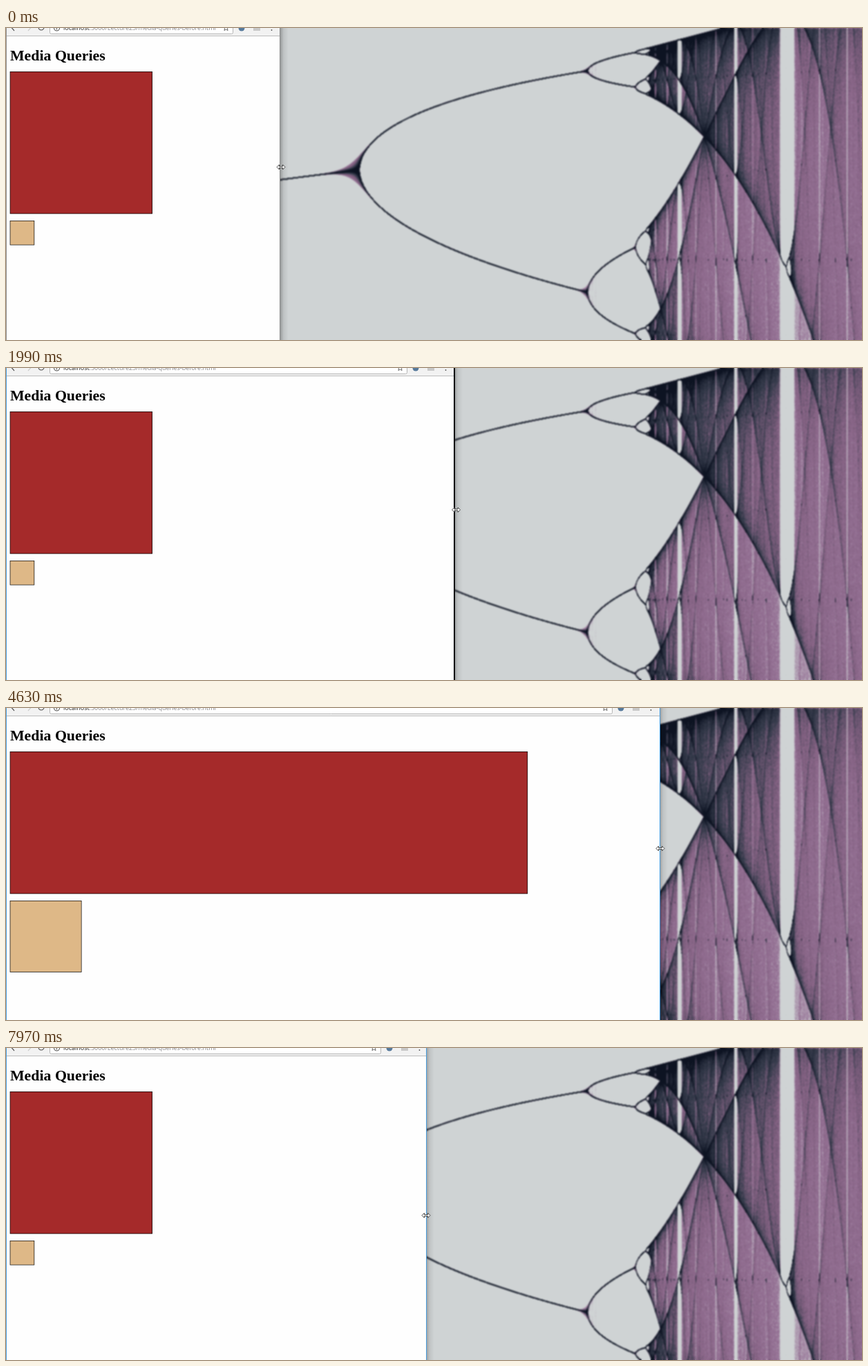
An HTML page with a canvas that plays this animation: 1239 by 452 pixels, repeating every 8000 ms.

```html
<!DOCTYPE html>
<html lang="en">
<head>
<meta charset="utf-8">
<title>Media Queries</title>
<style>
  html, body { margin: 0; height: 100%; overflow: hidden; background: #cfd3d4; }
  canvas { display: block; }
</style>
</head>
<body>
<canvas id="stage" width="1239" height="452"></canvas>
<script>
const WIDTH = 1239, HEIGHT = 452, LOOP = 8000;
const PX = 0.683; // screen pixels per CSS pixel of the shown page
const ctx = document.getElementById('stage').getContext('2d');

const mix = (a, b, p) => a + (b - a) * p;
const clamp01 = p => Math.min(1, Math.max(0, p));

// Piecewise linear value of rows [key, a, b, ...].
function track(rows, key, column = 1) {
  const next = rows.findIndex(row => row[0] > key);
  if (next === 0) return rows[0][column];
  if (next < 0) return rows[rows.length - 1][column];
  const a = rows[next - 1], b = rows[next];
  return mix(a[column], b[column], (key - a[0]) / (b[0] - a[0]));
}

// Density of the attractor to colour: grey, purple, slate, navy.
const RAMP = [
  [0, 207, 211, 212], [0.5, 150, 114, 150], [0.95, 132, 97, 130], [1.9, 54, 60, 76], [4, 13, 19, 34]
];

// Wallpaper: bifurcation diagram of the logistic map x -> r x (1 - x).
function makeWallpaper() {
  const LEFT = 390, SUBS = 8, SKIP = 60, STEPS = 3000, SCALE = 783;
  const sharp = new OffscreenCanvas(WIDTH, HEIGHT);
  const g = sharp.getContext('2d');
  const image = g.createImageData(WIDTH, HEIGHT);
  const unit = SCALE / (SUBS * STEPS);
  let seed = 7;
  const random = () => (seed = seed * 16807 % 2147483647) / 2147483647;

  for (let px = LEFT; px < WIDTH; px++) {
    const density = new Float32Array(HEIGHT + 1);
    for (let sub = 0; sub < SUBS; sub++) {
      const r = 3 + (px + (sub + 0.5) / SUBS - 512) / 734.2;
      let x = 0.42 + 0.1 * random();
      for (let i = 0; i < SKIP + STEPS; i++) {
        x = r * x * (1 - x);
        if (i < SKIP) continue;
        const y = 727 - SCALE * x;
        if (y < 0 || y >= HEIGHT) continue;
        const row = y | 0;
        density[row] += unit * (1 - y + row);
        density[row + 1] += unit * (y - row);
      }
    }
    for (let y = 0; y < HEIGHT; y++) {
      const at = (y * WIDTH + px) * 4;
      for (let c = 0; c < 3; c++) image.data[at + c] = track(RAMP, density[y], c + 1);
      image.data[at + 3] = 255;
    }
  }
  g.putImageData(image, 0, 0);

  const soft = new OffscreenCanvas(WIDTH, HEIGHT);
  const s = soft.getContext('2d');
  s.drawImage(sharp, 0, 0);
  s.filter = 'blur(0.9px)';
  s.drawImage(sharp, 0, 0);
  return soft;
}
const wallpaper = makeWallpaper();

// Drag of the window's right edge: [time, edge, pointer y].
const DRAG = [
  [300, 397, 201], [1110, 546, 211], [1974, 649, 205], [3375, 859, 202], [4540, 946, 203],
  [6645, 947, 289], [7264, 785, 265], [7965, 608, 242]
];
const RELEASE = 4862, REST = 5700, RETURN = 5885, GRAB = 6260;

// Between the drags the pointer circles once over the stage and comes back.
function freePointer(t) {
  const angle = 0.9 + 4.65 * clamp01((t - RELEASE) / (REST - RELEASE));
  const back = clamp01((t - RETURN) / (GRAB - RETURN));
  return [mix(671 + 467 * Math.cos(angle), 947, back), mix(245 - 195 * Math.sin(angle), 289, back)];
}

function box(x, y, w, h, fill) {
  ctx.fillStyle = fill;
  ctx.fillRect(x, y, w, h);
}

function borderedBox(x, y, w, h, fill) {
  box(x, y, w + 2 * PX, h + 2 * PX, '#000');
  box(x + PX, y + PX, w, h, fill);
}

function path(points, stroke, width = 1, fill) {
  ctx.beginPath();
  points.forEach(([x, y]) => ctx.lineTo(x, y));
  if (fill) {
    ctx.closePath();
    ctx.fillStyle = fill;
    ctx.fill();
  }
  ctx.lineWidth = width;
  ctx.strokeStyle = stroke;
  ctx.stroke();
}

function disc(x, y, r, fill, stroke) {
  ctx.beginPath();
  ctx.arc(x, y, r, 0, 7);
  if (fill) { ctx.fillStyle = fill; ctx.fill(); }
  if (stroke) { ctx.lineWidth = 1.1; ctx.strokeStyle = stroke; ctx.stroke(); }
}

function text(string, x, y, font, fill) {
  ctx.font = font;
  ctx.fillStyle = fill;
  ctx.fillText(string, x, y);
  return x + ctx.measureText(string).width;
}

function drawToolbar(w) {
  box(1, 0, w - 1, 12, '#f2f2f2');
  box(1, 11, w - 1, 1, '#bcbcbc');
  ctx.beginPath();
  ctx.roundRect(63.5, -12, w - 132, 20.5, 2);
  ctx.fillStyle = '#fff';
  ctx.fill();
  ctx.lineWidth = 1;
  ctx.strokeStyle = '#b4b4b4';
  ctx.stroke();

  const chevron = (x, dir, color) => path([[x, -5], [x + 4 * dir, -0.5], [x, 4]], color, 1.2);
  chevron(12, -1, '#555');
  chevron(32, 1, '#ccc');
  disc(51, -1, 4, null, '#555');
  disc(73.5, 0, 4, null, '#555');
  box(73, -0.5, 1, 3, '#555');

  const font = '8.97px "Open Sans", sans-serif';
  const end = text('localhost', 83, 3, font, '#222');
  text(':3000/Lecture23/media-queries-before.html', end, 3, font, '#85858a');

  const star = Array.from({ length: 11 }, (_, i) => {
    const r = i % 2 ? 2 : 4.4, a = i * Math.PI / 5 - Math.PI / 2;
    return [w - 78.5 + r * Math.cos(a), r * Math.sin(a)];
  });
  path(star, '#555', 0.9);
  disc(w - 56, 0, 4.5, '#56799b');
  box(w - 39, -4, 10, 8, '#c8c8c8');
  for (const y of [-1, 3]) disc(w - 12.5, y, 0.9, '#555');
}

function drawPage(viewport) {
  const margin = 8 * PX, content = viewport - 2 * margin, css = viewport / PX;
  const [red, tan] = css >= 1200 ? [content * 0.8, 150 * PX]
    : css >= 992 ? [content * 0.5, 100 * PX]
    : [300 * PX, 50 * PX];
  text('Media Queries', margin + 0.5, 47, `bold ${32 * PX}px "Liberation Serif", serif`, '#000');
  borderedBox(margin + 0.2, 63, red, 300 * PX, '#a52a2a');
  borderedBox(margin + 0.2, 279, tan, tan, '#deb887');
}

function drawResizeCursor(x, y) {
  const quarter = [[6, 0], [2.5, 3.5], [2.5, 1]];
  const mirror = (points, sx, sy) => points.map(([a, b]) => [a * sx, b * sy]);
  const right = [...mirror(quarter, 1, -1).reverse(), ...quarter];
  path([...right, ...mirror(right, -1, -1)].map(([a, b]) => [x + a, y + b]), '#333', 0.9, '#fff');
}

function drawArrowCursor(x, y) {
  const shape = [[0, 0], [0, 11.5], [2.7, 9], [4.4, 13], [6.2, 12.2], [4.5, 8.3], [8, 8.3]];
  path(shape.map(([a, b]) => [x + a, y + b]), '#111', 0.8, '#fff');
}

function draw(time) {
  const t = time < 340 ? 0 : 340 + Math.floor((time - 340) / 77.8) * 77.8;
  const edge = Math.round(track(DRAG, t));
  const focused = time >= 170;
  const growing = t >= 340 && t < 4600;
  const shrinking = t > 6700;

  ctx.drawImage(wallpaper, 0, 0);
  const shadow = ctx.createLinearGradient(edge, 0, edge + 12, 0);
  shadow.addColorStop(0, 'rgba(0,0,0,.27)');
  shadow.addColorStop(0.4, 'rgba(0,0,0,.08)');
  shadow.addColorStop(1, 'rgba(0,0,0,0)');
  box(edge, 0, 12, HEIGHT, shadow);

  ctx.save();
  ctx.beginPath();
  ctx.rect(0, 0, edge, HEIGHT);
  ctx.clip();
  box(0, 0, edge, HEIGHT, '#fefefe');
  drawToolbar(edge + (shrinking ? 3 : 0));
  drawPage(track(DRAG, t - (shrinking ? 60 : 20))); // layout trails the edge
  ctx.restore();

  const border = focused ? '#4a9fe0' : '#8f8f8f';
  box(0, 0, 1, HEIGHT, border);
  if (growing) {
    const gap = t < 1500 ? 4 : 2; // unpainted strip, wider while the drag is fast
    box(edge + 1 - gap, 0, gap, HEIGHT, '#060a12');
  } else {
    box(edge - (focused ? 0 : 1), 0, 1, HEIGHT, border);
  }

  if (t > RELEASE + 10 && t < GRAB - 30) drawArrowCursor(...freePointer(t));
  else drawResizeCursor(edge + (shrinking ? 0 : growing ? 2.5 : 1), track(DRAG, t < 5000 ? Math.min(t, 4540) : t < 6645 ? 6645 : t, 2) + 0.5);
}

function frame() {
  draw(performance.now() % LOOP);
  requestAnimationFrame(frame);
}
frame();
</script>
</body>
</html>
```
